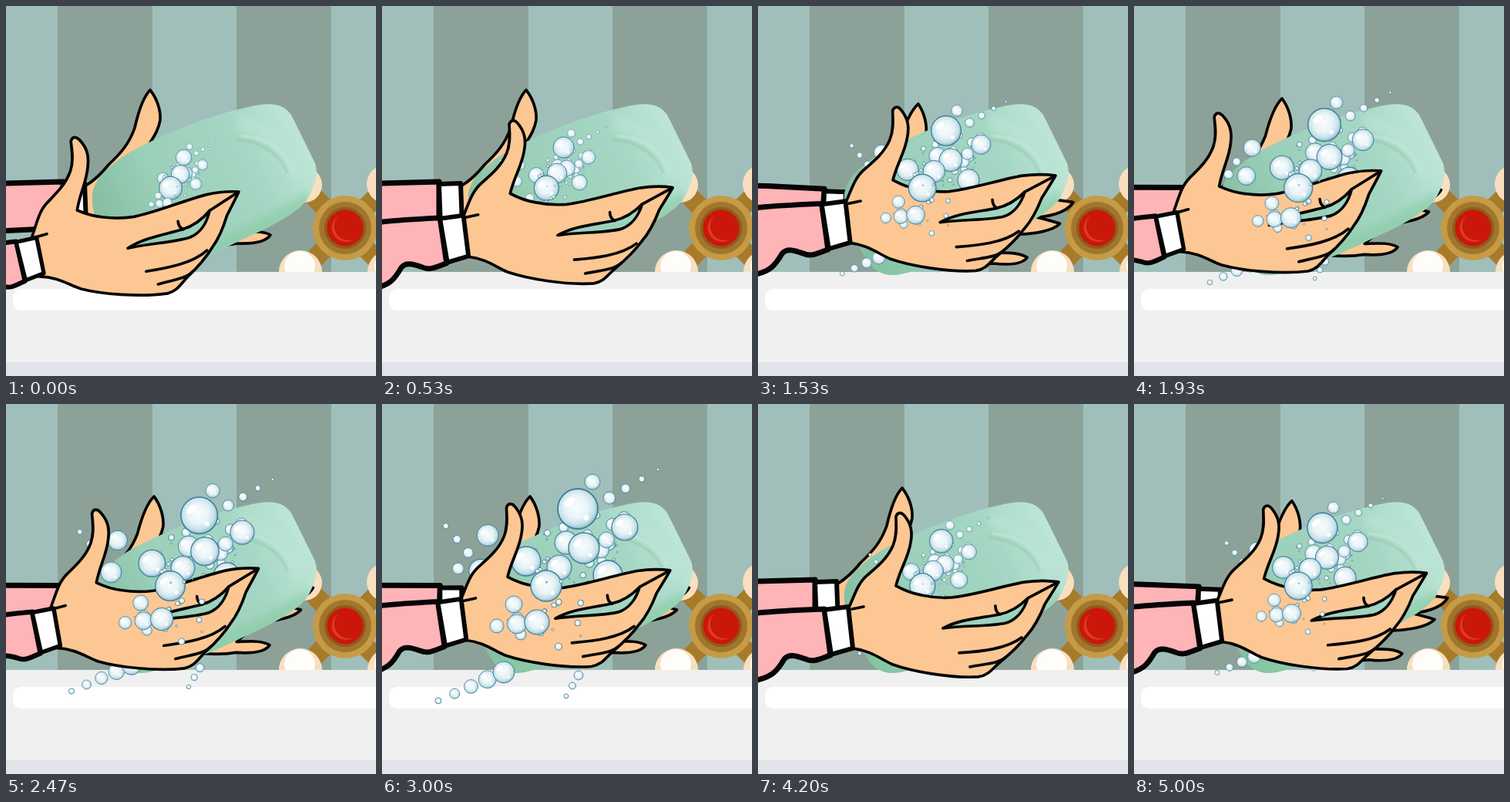
Write an HTML page that moves like this. It is 480 px wide and 480 px high and loops after 5.07 s.

```html
<!DOCTYPE html>
<html lang="en">
<head>
<meta charset="utf-8">
<title>Washing hands</title>
<style>
html, body { margin: 0; width: 100%; height: 100%; overflow: hidden; background: #a0bfba; }
svg { display: block; width: 100vw; height: 100vh; }
.skin { fill: #fdc793; fill-rule: evenodd; }
.ink { stroke: #050505; stroke-width: 3.7; stroke-linejoin: round; stroke-linecap: round; }
.line { fill: none; }
.sleeve { fill: #ffb4b7; stroke-width: 7; }
.cuff { fill: #fff; stroke-width: 6; }
</style>
</head>
<body>
<svg viewBox="0 0 480 480" xmlns="http://www.w3.org/2000/svg">
  <defs>
    <linearGradient id="soapFill" gradientUnits="userSpaceOnUse" x1="120" y1="265" x2="365" y2="145">
      <stop offset="0" stop-color="#86bfa2"/>
      <stop offset=".3" stop-color="#9acfb8"/>
      <stop offset=".75" stop-color="#a5d7c4"/>
      <stop offset="1" stop-color="#bce5d6"/>
    </linearGradient>
    <radialGradient id="bubbleFill" cx=".47" cy=".45" r=".56">
      <stop offset="0" stop-color="#f8fcfd"/>
      <stop offset=".5" stop-color="#e9f4f7"/>
      <stop offset=".8" stop-color="#c6e0e9"/>
      <stop offset="1" stop-color="#86b6c8"/>
    </radialGradient>
    <filter id="soft" x="-30%" y="-30%" width="160%" height="160%"><feGaussianBlur stdDeviation="5"/></filter>
    <filter id="fine" x="-30%" y="-30%" width="160%" height="160%"><feGaussianBlur stdDeviation="1.3"/></filter>
    <path id="soapShape" d="M112 245C114 225 132 208 160 190C200 168 270 138 330 128C352 125 366 131 373 147L401 204C406 218 400 235 390 252C372 274 330 292 300 306C262 325 220 340 185 348C165 352 150 344 142 330C125 305 110 270 112 245Z"/>
    <clipPath id="soapClip"><use href="#soapShape"/></clipPath>
  </defs>

  <rect width="480" height="480" fill="#a0bfba"/>
  <path d="M67 0H190V346H67ZM299 0H422V346H299Z" fill="#8ca298"/>

  <g id="tap">
    <path d="M396 244L484 332M484 244L396 332" stroke="#a67b29" stroke-width="25"/>
    <g fill="#f8dfc0">
      <circle cx="387" cy="232" r="23"/><circle cx="493" cy="231" r="25"/>
      <circle cx="382" cy="345" r="28"/><circle cx="497" cy="345" r="28"/>
    </g>
    <g fill="#fffdf9">
      <circle cx="381" cy="338" r="20"/><circle cx="498" cy="338" r="20"/>
    </g>
    <circle cx="440" cy="288" r="42" fill="#c59b46"/>
    <circle cx="440" cy="288" r="34" fill="#a2752c"/>
    <circle cx="440" cy="288" r="27" fill="#8f5a1d"/>
    <circle cx="440" cy="288" r="23.5" fill="#ca1709"/>
    <path d="M431 272A18 18 0 1 0 451 303A19 19 0 0 1 431 272Z" fill="#dc3a20"/>
  </g>

  <rect y="345" width="480" height="117" fill="#f0f0f0"/>
  <rect x="9" y="367" width="490" height="28" rx="11" fill="#fff"/>
  <rect y="462" width="480" height="18" fill="#e2e4e9"/>

  <g id="back">
    <path class="ink sleeve" d="M-90 234L0 230L74 228V288L-90 296Z"/>
    <path class="ink skin" d="M102 234C112 228 122 220 133 206C150 190 160 178 167 158C172 136 178 118 187 109C196 120 201 136 200 148C197 166 186 176 180 190C196 208 290 214 397 221C391 233 376 240 352 244C364 246 374 248 382 250C374 260 350 266 328 268L300 294C318 293 332 291 343 297C338 305 326 309 300 308C250 318 180 300 104 284Z"/>
    <path class="ink cuff" d="M74 231L102 230L104 284L76 287Z"/>
  </g>

  <use href="#soapShape" fill="url(#soapFill)"/>
  <g clip-path="url(#soapClip)" fill="none">
    <path d="M142 335C160 355 300 315 395 250" stroke="#88cba3" stroke-width="22" opacity=".6" filter="url(#soft)"/>
    <path d="M300 150C345 158 372 190 380 225" stroke="#bce4d5" stroke-width="20" opacity=".6" filter="url(#soft)"/>
    <path d="M304 168C338 170 363 187 371 213" stroke="#c3e5d7" stroke-width="3.5" opacity=".8" filter="url(#fine)"/>
    <path d="M300 173C334 177 356 192 365 217" stroke="#8ac3aa" stroke-width="3" opacity=".5" filter="url(#fine)"/>
  </g>

  <g id="late"></g>
  <g id="wide"></g>
  <g id="under"></g>

  <g id="front">
    <path class="ink skin" d="M118 264C126 246 130 232 142 222C156 210 168 200 175 184C181 170 179 156 179 146C181 140 186 140 190 145C198 155 201 165 198 180C195 200 184 215 179 236C190 242 200 246 212 248C226 251 238 252 252 251C280 248 318 236 347 231C362 229 377 229 390 231C383 243 377 252 372 260C366 275 358 290 349 300C340 312 330 322 315 334C305 342 300 352 286 354C250 356 200 347 175 338C160 332 148 320 122 317Z
      M240 291C262 279 288 278 313 273C328 270 340 262 350 252C345 268 335 280 322 284C300 289 270 287 240 291Z"/>
    <path class="ink line" d="M350 252L388 232M308 262C308 267 310 271 314 273M261 323C290 321 322 318 342 303M275 341C296 337 312 337 322 328M122 266L137 263"/>
    <g id="arm">
      <path class="ink sleeve" d="M-90 278L0 271C30 268 60 267 86 266L94 326C82 330 72 336 62 331C48 326 40 324 34 331C24 348 18 353 0 358C-30 372 -60 380 -90 384Z"/>
      <path class="ink cuff" d="M86 267L117 263L123 317L95 325Z"/>
    </g>
  </g>

  <g id="over"><g id="core"></g><g id="near"></g></g>
</svg>

<script>
const LOOP = 5.07, FRAMES = 76, RESTART = 3.42;
const $ = id => document.getElementById(id);

// Waypoints of each hand's fingertip: seconds, x, y
const frontPath = [[0, 302, 241], [.31, 350, 245], [.78, 390, 231], [1.55, 386, 220], [2.25, 300, 212], [3.2, 378, 216]];
const backPath = [[.8, 187, 109], [1.07, 156, 116], [1.5, 210, 128], [1.95, 192, 120]];

const clamp = v => Math.min(1, Math.max(0, v));
const easeOut = k => Math.sin(clamp(k) * Math.PI / 2);
const growth = t => .4 + .25 * t - .0167 * t * t;

function along(path, t) {
  const i = Math.max(1, path.findIndex(p => p[0] > t));
  const next = t >= path.at(-1)[0] ? path.length - 1 : i;
  const [t0, x0, y0] = path[next - 1], [t1, x1, y1] = path[next];
  const k = easeOut((t - t0) / (t1 - t0));
  return [x0 + (x1 - x0) * k, y0 + (y1 - y0) * k];
}

let seed = 17;
const rand = () => (seed = (seed * 16807) % 2147483647) / 2147483647;

// Evenly spaced bubbles from one [x, y, radius] to another
const trail = (n, from, to) =>
  Array.from({ length: n }, (_, i) => from.map((v, j) => v + (to[j] - v) * i / (n - 1)));

const scatter = (n, x, y, spread, size) => Array.from({ length: n }, () => {
  const a = rand() * Math.PI * 2, d = Math.sqrt(rand()) * spread;
  return [x + Math.cos(a) * d, y + Math.sin(a) * d * .85, 1 + rand() ** 2 * size];
});

const bubbles = {
  wide: [
    [254, 136, 26], [315, 160, 17], [293, 222, 19], [262, 187, 20], [239, 180, 15], [187, 204, 19], [273, 101, 10],
    ...trail(4, [295, 122, 8], [358, 85, 2]),
    ...trail(5, [158, 348, 14], [73, 385, 4]),
    ...trail(3, [255, 352, 6], [239, 379, 3]),
    ...scatter(45, 262, 182, 66, 10)
  ],
  late: [[132, 166, 15], [122, 215, 16], [91, 212, 8], ...trail(3, [74, 153, 4], [105, 190, 7])],
  core: [[230, 212, 16], [213, 236, 20], ...scatter(10, 222, 228, 34, 7)],
  near: [
    ...trail(3, [201, 283, 16], [149, 288, 9]),
    ...trail(3, [171, 260, 11], [180, 299, 7]),
    ...scatter(20, 215, 272, 55, 5)
  ]
};

const draw = ([x, y, r]) =>
  `<g transform="translate(${x} ${y}) scale(${r})">
    <circle r="1" fill="url(#bubbleFill)" stroke="#3f7e99" stroke-width="${Math.max(.8 / r, .07)}"/>
    <ellipse cx="-.1" cy="-.53" rx=".32" ry=".18" fill="#fff" transform="rotate(-40)"/>
    <circle cx=".42" cy=".45" r=".13" fill="#fff"/>
  </g>`;
for (const id in bubbles) {
  $(id).innerHTML = bubbles[id].sort((a, b) => a[2] - b[2]).map(draw).join("");
}

const place = (id, transform) => $(id).setAttribute("transform", transform);
const turn = (id, x, y, angle, px, py) =>
  place(id, `translate(${x} ${y}) rotate(${angle}) translate(${-px} ${-py})`);
const spread = (id, s) =>
  place(id, `translate(215 237) scale(${s}) translate(-215 -237)`);

function render(seconds) {
  const frame = Math.floor((seconds % LOOP + .005) * FRAMES / LOOP) % FRAMES;
  const t = frame * LOOP / FRAMES;
  const age = t < RESTART ? t : t - RESTART;

  const [fx, fy] = along(frontPath, age);
  const tilt = (fx - 390) / 17;
  turn("front", fx, fy, tilt, 390, 231);
  place("arm", `translate(${118 - tilt * 1.2} 290) scale(${1 + tilt * .025}) translate(-118 -290)`);

  const [bx, by] = along(backPath, age);
  turn("back", bx, by, (bx + by - 296) / 9, 187, 109);

  const s = growth(age);
  spread("wide", s);
  spread("near", s);
  spread("core", .58 + .42 * s);
  spread("late", growth(Math.max(0, age - .4)));
  $("late").style.display = age > .4 ? "" : "none";

  // The nearest foam rises above the hand partway through
  const home = $(age > .92 ? "over" : "under");
  if ($("core").parentNode !== home) home.append($("core"), $("near"));
}

const start = performance.now();
function tick() {
  render((performance.now() - start) / 1000);
  requestAnimationFrame(tick);
}
tick();
</script>
</body>
</html>
```
